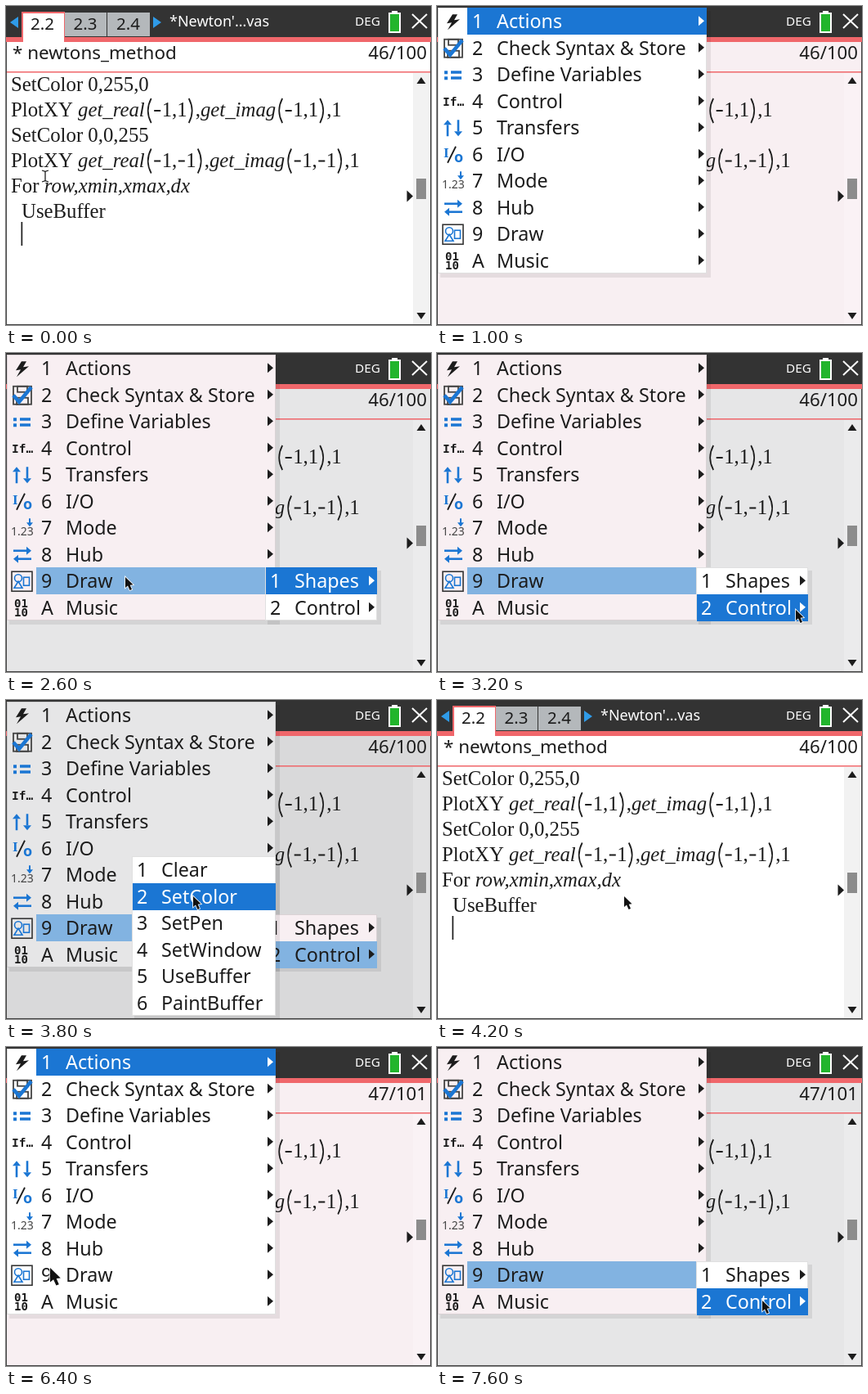
These frames come from a looping animation (520 px wide and 390 px high, 8000 ms). An HTML page with a canvas:

```html
<!DOCTYPE html>
<html lang="en">
<head>
<meta charset="utf-8">
<style>
html, body { margin: 0; width: 100%; height: 100%; overflow: hidden; background: #fff; }
canvas { display: block; }
</style>
</head>
<body>
<canvas id="stage" width="520" height="390"></canvas>
<script>
const ctx = document.getElementById('stage').getContext('2d');
const LOOP = 8000;
const SANS = '"Noto Sans", "Open Sans", sans-serif';
const SERIF = '"Liberation Serif", serif';
const MONO = '"DejaVu Sans Mono", monospace';
const CODE = 24.8;
const INK = '#1c1c1c', BLUE = '#1b76d3', PALE_BLUE = '#82b3e1', RED = '#f0676b';
const SHADES = ['#ffffff', '#f8eff2', '#e6e6e7', '#d9d9da'];

const MENUS = [
  { x: 1, y: 2, w: 329, h: 325, num: 43, label: 73, bar: 37, arrows: true, icons: true,
    items: ['Actions', 'Check Syntax & Store', 'Define Variables', 'Control', 'Transfers',
            'I/O', 'Mode', 'Hub', 'Draw', 'Music'] },
  { x: 317, y: 262, w: 137, h: 65, num: 323, label: 353, bar: 318, arrows: true,
    items: ['Shapes', 'Control'] },
  { x: 154, y: 191, w: 176, h: 195, num: 160, label: 190, bar: 155,
    items: ['Clear', 'SetColor', 'SetPen', 'SetWindow', 'UseBuffer', 'PaintBuffer'] }
];

// Each step overrides parts of the state before it; "open" lists the picked row per menu.
const STEPS = [
  { t: 0, open: [], pointer: ['beam', 48, 208], typed: '', caret: true, count: '46/100' },
  { t: 200, pointer: null },
  { t: 1000, open: [0] },
  { t: 1200, pointer: ['arrow', 54, 270] },
  { t: 1400, open: [8], pointer: ['arrow', 110, 273] },
  { t: 1600, pointer: ['arrow', 140, 274] },
  { t: 2000, pointer: ['arrow', 139, 274] },
  { t: 2400, open: [8, 0] },
  { t: 2600, pointer: ['arrow', 146, 274] },
  { t: 3000, pointer: ['arrow', 350, 284] },
  { t: 3200, open: [8, 1], pointer: ['arrow', 439, 314] },
  { t: 3600, open: [8, 1, 0] },
  { t: 3800, open: [8, 1, 1], pointer: ['arrow', 229, 240] },
  { t: 4200, open: [], pointer: ['arrow', 229, 240] },
  { t: 4600, typed: 'SetColor ' },
  { t: 5000, typed: 'SetColor 0' },
  { t: 5200, typed: 'SetColor 0,' },
  { t: 5400, caret: false },
  { t: 5600, typed: 'SetColor 0,0', caret: true },
  { t: 5800, typed: 'SetColor 0,0,' },
  { t: 6000, typed: 'SetColor 0,0,0' },
  { t: 6200, newLine: true, count: '47/101' },
  { t: 6400, open: [0], pointer: ['arrow', 54, 270, 1.35] },
  { t: 6800, open: [8], pointer: ['arrow', 142, 275, 1.05] },
  { t: 7200, pointer: ['arrow', 141, 275] },
  { t: 7600, open: [8, 1], pointer: ['arrow', 398, 310] }
];

function rect(x, y, w, h, color) {
  ctx.fillStyle = color;
  ctx.fillRect(x, y, w, h);
}

function text(str, x, y, font, color = INK, align = 'left') {
  ctx.font = font;
  ctx.fillStyle = color;
  ctx.textAlign = align;
  ctx.fillText(str, x, y);
  return ctx.measureText(str).width;
}

function path(points, closed) {
  ctx.beginPath();
  points.forEach(([x, y]) => ctx.lineTo(x, y));
  if (closed) ctx.closePath();
}

function poly(points, color) {
  path(points, true);
  ctx.fillStyle = color;
  ctx.fill();
}

function line(points, color, width, closed) {
  path(points, closed);
  ctx.strokeStyle = color;
  ctx.lineWidth = width;
  ctx.stroke();
}

// Horizontal triangle: positive w points right, negative left.
function tri(x, y, w, h, color) {
  poly([[x, y - h], [x + w, y], [x, y + h]], color);
}

function paren(x, base, side) {
  const edge = x + 5 + 3 * side, bow = x + 5 - 5 * side;
  ctx.beginPath();
  ctx.moveTo(edge, base - 22);
  ctx.quadraticCurveTo(bow, base - 7, edge, base + 8);
  ctx.strokeStyle = INK;
  ctx.lineWidth = 1.7;
  ctx.stroke();
  return 10;
}

// Code markup: *italic*, ( ) tall brackets, ~ short minus.
function code(str, x, base) {
  let italic = false;
  for (const part of str.split(/([*()~])/)) {
    if (part === '*') italic = !italic;
    else if (part === '(') x += paren(x, base, 1);
    else if (part === ')') x += paren(x, base, -1);
    else if (part === '~') { rect(x + 1.5, base - 8, 8, 2, INK); x += 11; }
    else if (part) x += text(part, x, base, `${italic ? 'italic ' : ''}${CODE}px ${SERIF}`);
  }
  return x;
}

function drawHeader() {
  rect(0, 0, 520, 38, '#333333');
  rect(0, 38, 520, 6, RED);
  tri(15, 20, -10, 7, '#2f9be8');
  tri(180, 20, 10, 7, '#2f9be8');
  rect(72, 8, 51, 29, '#b4b8bb');
  rect(124, 8, 52, 29, '#b4b8bb');
  rect(19, 7, 53, 37, RED);
  rect(21, 9, 50, 35, '#fff');
  ['2.2', '2.3', '2.4'].forEach((s, i) => text(s, 30 + 52.5 * i, 29, `20.5px ${SANS}`));
  text("*Newton'…vas", 200, 25, `18px ${SANS}`, '#fff');
  text('DEG', 427, 24, `15.3px ${SANS}`, '#fff');
  rect(472, 6, 7, 3, '#fff');
  rect(468, 8, 15, 25, '#fff');
  rect(470, 10, 11, 21, '#22b52c');
  line([[497, 10], [515, 27]], '#fff', 2);
  line([[515, 10], [497, 27]], '#fff', 2);
}

function drawEditor(s) {
  rect(0, 44, 520, 346, SHADES[s.open.length]);
  drawHeader();
  text('* newtons_method', 8, 65, `22.4px ${SANS}`);
  text(s.count, 515, 65, `22.2px ${SANS}`, INK, 'right');
  rect(0, 80, 520, 1.5, RED);

  code('SetColor 0,255,0', 6, 104);
  code('PlotXY *get_real*(~1,1),*get_imag*(~1,1),1', 6, 135);
  code('SetColor 0,0,255', 6, 166);
  code('PlotXY *get_real*(~1,~1),*get_imag*(~1,~1),1', 6, 196.5);
  code('For *row,xmin,xmax,dx*', 6, 228);
  code('UseBuffer', 19, 258.5);
  const end = code(s.typed, 19, 289.5);
  if (s.caret) {
    const [x, y] = s.newLine ? [18.5, 295] : [end - 0.5, 264];
    rect(x, y, 1.7, 29, INK);
  }

  rect(498, 82, 20, 307, s.open.length ? 'rgba(255,255,255,.2)' : '#f2f2f2');
  poly([[502.5, 95], [508, 87], [513.5, 95]], INK);
  poly([[502.5, 375], [508, 383], [513.5, 375]], INK);
  rect(502, 211, 12, 25, '#8c8c8c');
  tri(490.5, 232.5, 7.5, 7, INK);
  rect(0, 44, 1, 346, '#444');
  rect(519, 44, 1, 346, '#444');
  rect(0, 389, 520, 1, '#444');
}

function blueArrow(x, y, dx, dy, len) {
  const tip = [x + dx * len, y + dy * len];
  const back = [tip[0] - dx * 6, tip[1] - dy * 6];
  line([[x, y], back], BLUE, 2.6);
  poly([tip, [back[0] + dy * 5, back[1] + dx * 5], [back[0] - dy * 5, back[1] - dx * 5]], BLUE);
}

// Icons are drawn around the vertical centre of their row.
const ICONS = [
  y => poly([[19, y - 9], [12, y + 2], [18, y + 1], [13, y + 10], [28, y - 3], [21, y - 2], [25, y - 9]], INK),
  y => {
    ctx.strokeStyle = '#444';
    ctx.lineWidth = 1.8;
    ctx.strokeRect(9, y - 11, 22, 22);
    ctx.strokeRect(14, y - 11, 12, 7);
    ctx.strokeRect(13, y + 3, 14, 8);
    line([[9, y], [16, y + 8], [31, y - 10]], BLUE, 4.5);
  },
  y => {
    for (const dy of [-5, 2]) {
      rect(9, y + dy, 4, 4, BLUE);
      rect(17, y + dy, 13, 3.5, BLUE);
    }
  },
  y => text('If…', 7, y + 5, `bold 14.5px ${MONO}`),
  y => { blueArrow(13, y + 10, 0, -1, 20); blueArrow(26, y - 10, 0, 1, 20); },
  y => {
    text('I', 8, y + 3, `bold 17px ${SERIF}`, BLUE);
    line([[13, y + 10], [23, y - 10]], INK, 1.8);
    text('o', 21, y + 9, `bold 18px ${SANS}`, BLUE);
  },
  y => {
    text('1.23', 6, y + 9, `14px ${SANS}`, '#444');
    line([[29, y - 12], [29, y - 5]], BLUE, 2);
    poly([[25, y - 7], [33, y - 7], [29, y - 2]], BLUE);
  },
  y => { blueArrow(9, y - 5, 1, 0, 22); blueArrow(31, y + 5, -1, 0, 22); },
  y => {
    ctx.strokeStyle = '#333';
    ctx.lineWidth = 1.6;
    ctx.strokeRect(7, y - 12, 25, 24);
    ctx.strokeStyle = BLUE;
    ctx.beginPath();
    ctx.arc(15, y - 4, 4.5, 0, 7);
    ctx.stroke();
    ctx.strokeRect(21.5, y - 5, 7, 10);
    line([[10, y + 8], [15, y], [20, y + 8]], BLUE, 1.6, true);
  },
  y => {
    text('01', 10, y - 1, `bold 14px ${MONO}`);
    text('10', 10, y + 10, `bold 14px ${MONO}`);
  }
];

function drawMenu(menu, picked, depth) {
  const { x, y, w, h, items } = menu;
  const pitch = h / items.length;
  rect(x + 3, y + 4, w + 2, h + 1, 'rgba(0,0,0,.08)');
  rect(x, y, w, h, SHADES[depth]);
  ctx.strokeStyle = 'rgba(0,0,0,.12)';
  ctx.lineWidth = 1;
  ctx.strokeRect(x + 0.5, y + 0.5, w - 1, h - 1);

  items.forEach((item, i) => {
    const top = y + pitch * i, mid = top + pitch / 2 + 1;
    const active = i === picked && depth === 0;
    const color = active ? '#fff' : INK;
    if (i === picked) rect(menu.bar, Math.round(top), x + w - menu.bar, 33, active ? BLUE : PALE_BLUE);
    if (menu.icons) ICONS[i](mid);
    const font = `23.3px ${SANS}`;
    text(i === 9 ? 'A' : String(i + 1), menu.num, mid + 8, font, color);
    text(item, menu.label, mid + 8, font, color);
    if (menu.arrows) tri(x + w - 10, mid - 1, 7, 6, color);
  });
}

function drawPointer([kind, x, y, scale = 1]) {
  if (kind === 'beam') {
    line([[x, y - 6], [x, y + 6]], INK, 1.3);
    for (const end of [-7, 7]) line([[x - 4, y + end], [x, y + end * 0.8], [x + 4, y + end]], INK, 1.2);
    return;
  }
  const shape = [[0, 0], [0, 13], [3, 10.5], [5.5, 16], [8, 15], [5.7, 9.7], [9.5, 9.3]]
    .map(([px, py]) => [x + px * scale, y + py * scale]);
  line(shape, '#fff', 1.6, true);
  poly(shape, '#111');
}

function stateAt(time) {
  return Object.assign({}, ...STEPS.filter(step => step.t <= time));
}

function frame(now) {
  const state = stateAt(now % LOOP);
  drawEditor(state);
  state.open.forEach((picked, i) => drawMenu(MENUS[i], picked, state.open.length - 1 - i));
  if (state.pointer) drawPointer(state.pointer);
  requestAnimationFrame(frame);
}

requestAnimationFrame(frame);
</script>
</body>
</html>
```
